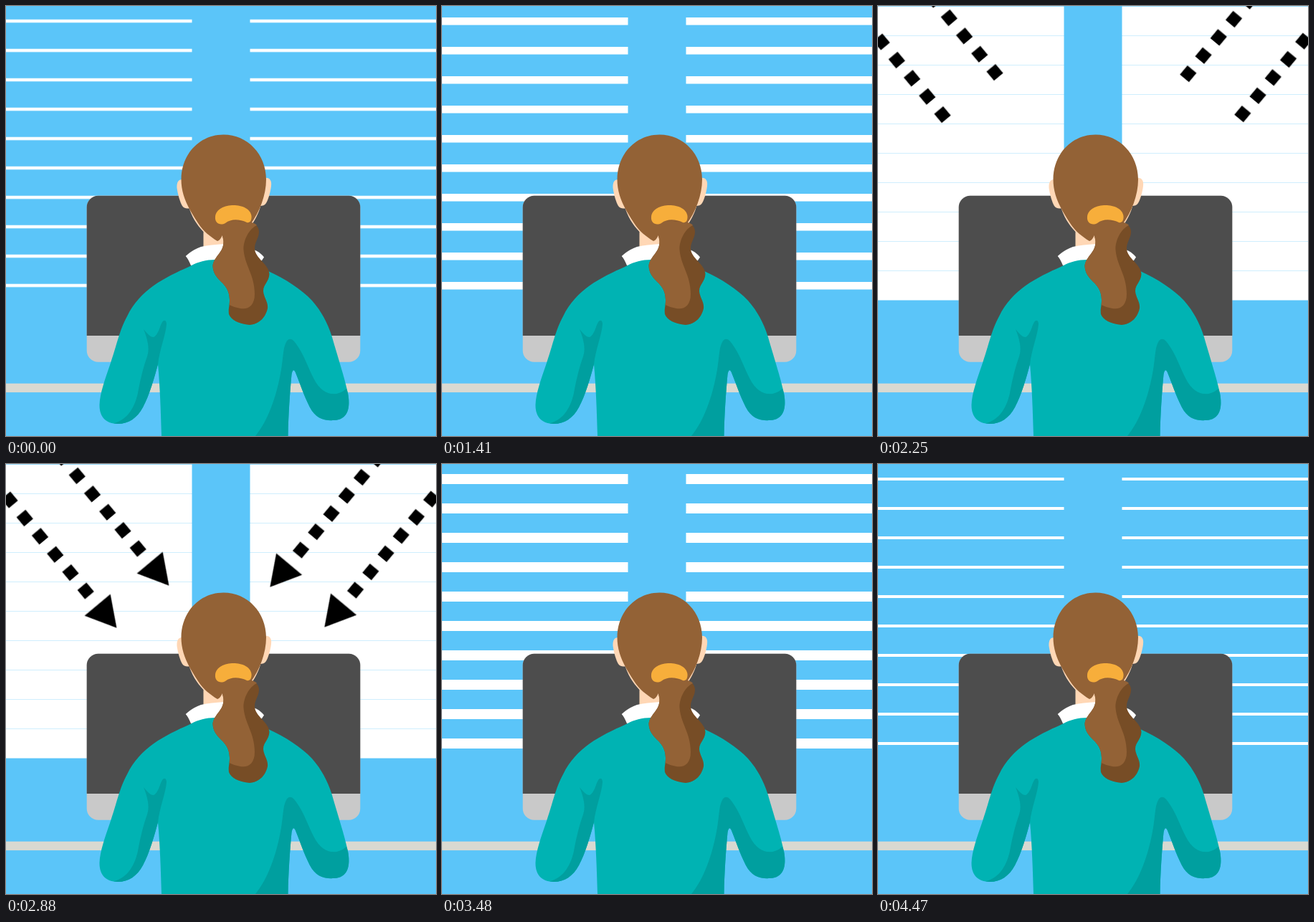
An HTML page for the animation above (4.5 s loop, 600 by 600 pixels).

```html
<!DOCTYPE html>
<html lang="en">
<head>
<meta charset="utf-8">
<title>At the desk</title>
<style>
html, body { margin: 0; width: 100%; height: 100%; overflow: hidden; background: #5bc5f9; }
svg { display: block; width: 100vw; height: 100vh; }
.slat {
  fill: #fff;
  transform-box: fill-box;
  transform-origin: center;
  animation: blind 4500ms linear infinite;
}
/* scaleY .112 = closed to a thin strip, 1 = full */
@keyframes blind {
  0%, 29.667% { transform: scaleY(.112); }
  39.667%, 70% { transform: scaleY(1); }
  80.1%, 100% { transform: scaleY(.112); }
}
#arrows { animation: clear 4500ms step-end infinite; }
@keyframes clear {
  0% { opacity: 1; }
  75.4%, 100% { opacity: 0; }
}
.part { opacity: 0; animation: part 4500ms step-end infinite; }
@keyframes part {
  0% { opacity: 1; }
  50%, 100% { opacity: 0; }
}
</style>
</head>
<body>
<svg viewBox="0 0 600 600">
  <rect width="600" height="600" fill="#5bc5f9"/>
  <g id="slats"></g>
  <rect x="259.5" width="81" height="412" fill="#5bc5f9"/>
  <g id="arrows"></g>
  <rect y="526.7" width="600" height="12.4" fill="#d9d9d1"/>

  <!-- monitor -->
  <rect x="112.7" y="264.7" width="381.6" height="232" rx="16" fill="#c9c9c9"/>
  <path d="M112.7 460V280.7a16 16 0 0 1 16-16H478.300a16 16 0 0 1 16 16V460Z" fill="#4d4d4d"/>

  <!-- skin and collar -->
  <g fill="#ffd7b5">
    <path d="M246 242C240 242 238 247 238.500 254C240 264 243 274 246 279C249 283 253 283 257 282Z"/>
    <path d="M361 240C368 239 371 244 370 251C369 260 366 270 363 275C361 278 358 279 354 279Z"/>
    <path d="M252 270C257 291 265 304 275.500 315L275.500 340H304V300Z"/>
    <path d="M358 262C357 280 351 293 343 305L330 300Z"/>
  </g>
  <path d="M250.700 349C257 343 264 339 272 336C282 333.500 292 333 304 332V362H258C256 357 254 353 250.700 349Z" fill="#fff"/>
  <path d="M340 338C350 341 356 345 360 350.500L357 355L345 362Z" fill="#fff"/>

  <!-- sweater -->
  <path fill="#00b3b3" d="M258 362.500C268 357 279 354 292 354L345 358L366 370C390 381 412 395 427 411
    C441 427 449 443 455 462C463 490 472 517 477 540C481 561 477 577 458 578C443 579 432 575 424 560
    C415 542 410 526 405 514C402 506 400 507 398.500 514C396 541 394 571 393.500 600H217
    C216 568 215 532 212 500C207 519 200 543 191 560C183 575 171 583 156 583C139 583 130 573 130.500 556
    C131 541 138 521 145 501C155 472 158 453 169 433C187 395 223 378 258 362.500Z"/>
  <g fill="#009f9f">
    <path d="M150 582.500C171 577 180 558 184 540C188 518 192 503 197 489C201 477 197 464 192 451
      C197 457 201 462 206 462C212 460 215 446 218 441C221 437 224 439 224 444C223 459 214 480 212 500
      C207 519 200 543 191 560C183 575 171 583 156 583Z"/>
    <path d="M348 600C366 578 377 545 383 513C387 493 386 478 391 469C394 463 399 464 403 469
      C415 484 422 506 430 521C440 541 459 548 475 534L477 540C481 561 477 577 458 578C443 579 432 575 424 560
      C415 542 410 526 405 514C402 506 400 507 398.500 514C396 541 394 571 393.500 600Z"/>
  </g>

  <!-- hair -->
  <path fill="#936236" d="M303.500 179.500C337 179.500 363 207 363 242C363 264 354 287 341 305L302 320
    C300 324 298 327 295 328C285 322 275 314 268 303C255 283 244.500 265 244.500 242C244.500 207 270 179.500 303.500 179.500Z"/>
  <path id="tail" fill="#774d26" d="M302 298L342 302C349 304 353 309 353 315C353 324 347 329 347 338
    C347 352 367 360 367.500 374C367 385 359 388 359 398C360 408 366 412 365 422C363 432 355 444 340 445
    C328 444 315 440 311 430C310 423 312 419 312 410C312 384 289 385 288.500 362C291 348 304 344 303.500 328C303 324 302 322 302 318Z"/>
  <path fill="#936236" d="M302 298L342 302C346 303 349 304 350 306C339 311 331 327 331.500 340
    C333 362 347 375 347 402C347 418 338 424 327 422C321 421 316 419 311.500 417
    C312 415 312 413 312 410C312 384 289 385 288.500 362C291 348 304 344 303.500 328C303 324 302 322 302 318Z"/>
  <path fill="#f7ae3b" d="M292 294C294 273 340 273 342.500 293C343 300 340 303 336 302C325 297 314 297 306 303C299 307 291 303 292 294Z"/>
</svg>
<script>
const NS = "http://www.w3.org/2000/svg";

function add(parent, tag, attrs) {
  const el = document.createElementNS(NS, tag);
  for (const k in attrs) el.setAttribute(k, attrs[k]);
  return parent.appendChild(el);
}

const slats = document.getElementById("slats");
for (let i = 0; i < 10; i++) {
  add(slats, "rect", { class: "slat", width: 600, height: 40.9, y: 0.65 + 41 * i });
}

// Six dashes, then the head; each part pops in 125 ms after the last.
const arrows = document.getElementById("arrows");
function arrow(x, y, flip) {
  const g = add(arrows, "g", {
    transform: `translate(${x} ${y}) scale(${flip} 1) rotate(50.1)`
  });
  for (let i = 0; i < 7; i++) {
    const d = i < 6
      ? `M${33.1 * (i - 5) - 8.25}-8.25h16.5v16.5h-16.5Z`
      : "M25.6-23.5L67.4 0L25.6 23.5Z";
    add(g, "path", { d, class: "part", style: `animation-delay:${1725 + 125 * i}ms` });
  }
}
arrow(111.2, 177, 1);
arrow(184.2, 118, 1);
arrow(487.6, 176, -1);
arrow(411.6, 120, -1);
</script>
</body>
</html>
```
